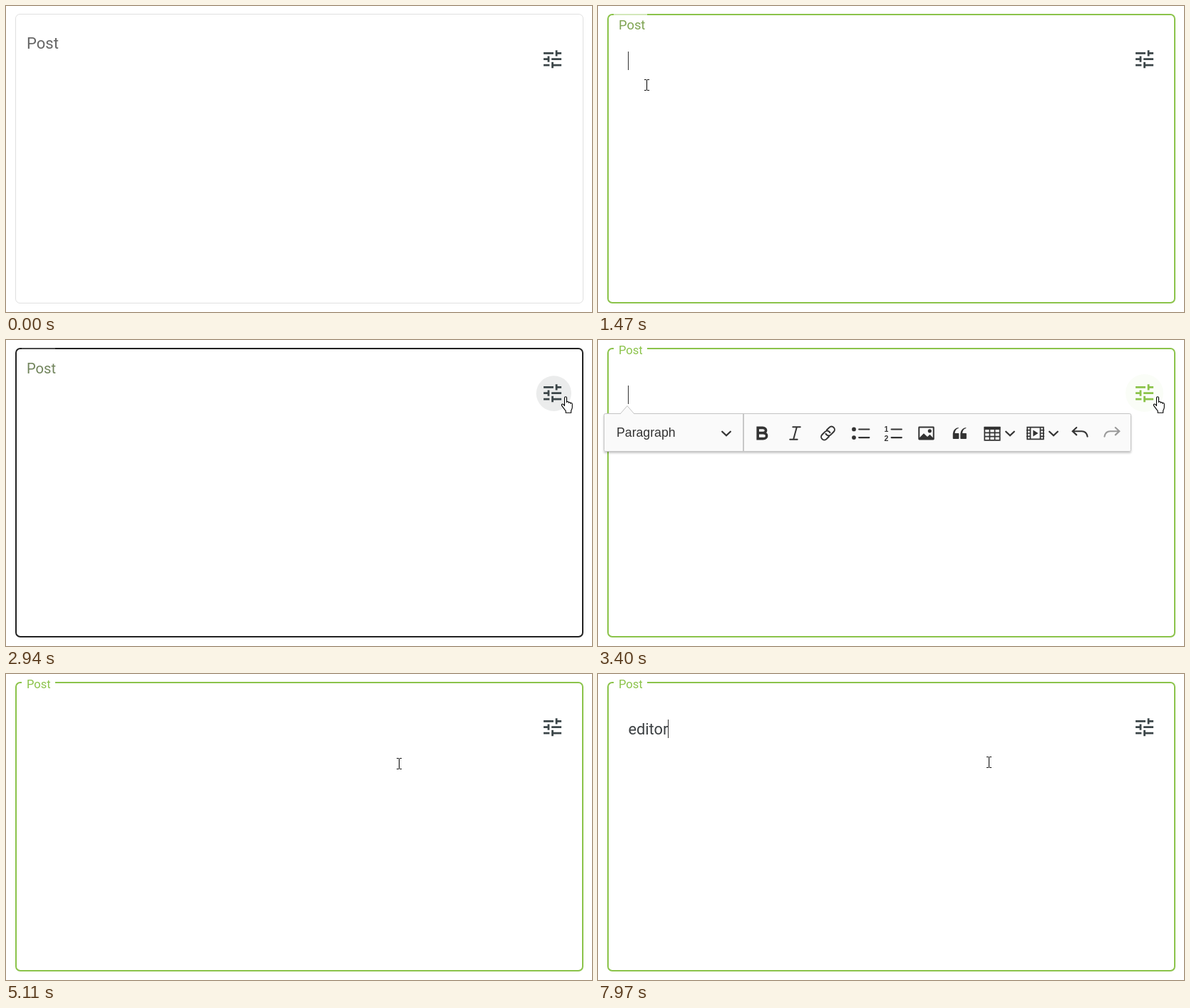
Write an HTML page with a canvas that moves like this. It is 822x430 px and loops after 8000 ms.

```html
<!DOCTYPE html>
<html lang="en">
<head>
<meta charset="utf-8">
<title>Post editor</title>
<style>
  html, body { margin: 0; width: 100%; height: 100%; overflow: hidden; background: #fff; }
  canvas { display: block; }
</style>
</head>
<body>
<canvas id="stage" width="822" height="430"></canvas>
<script>
const ctx = document.getElementById('stage').getContext('2d');
const LOOP = 8000;
const GREEN = [139, 195, 74], GREY = [102, 102, 102], DARK = [33, 33, 33], SLATE = [59, 69, 72];
const INK = '#333', PANEL = '#fafafa';
const BUTTON = { x: 766.5, y: 74.5, r: 26.5 };

const focusChanges = [[1380, 1], [2850, 0], [3075, 1], [3950, 0], [4175, 1]];
const caretSpans = [[1380, 1860], [2390, 2850], [3075, 3550], [4175, 4730], [5260, 5810],
  [6190, 6430], [6580, 6960], [7130, 7440], [7970, 8000]];
const keyTimes = [6190, 6360, 6580, 6810, 7130, 7360];
const pointerKeys = [[300, 44, 411], [1000, 66, 111], [1450, 66, 111], [2080, 790, 104],
  [2390, 785.5, 84], [2590, 785.5, 84], [2700, 784.5, 80], [3950, 784.5, 80], [4180, 780.5, 81],
  [4210, 780.5, 81], [4730, 554, 127], [4990, 554, 127], [5260, 548, 124]];

const clamp = v => Math.min(1, Math.max(0, v));
const lerp = (a, b, p) => a + (b - a) * p;
const rgb = (c, a = 1) => `rgba(${c.map(Math.round).join()},${a})`;
const mix = (a, b, p) => a.map((v, i) => lerp(v, b[i], p));
const within = (t, [a, b]) => t >= a && t < b;

// cubic-bezier(.25, .8, .25, 1)
function swift(x) {
  if (x <= 0) return 0;
  if (x >= 1) return 1;
  let lo = 0, hi = 1, s;
  for (let i = 0; i < 24; i++) {
    s = (lo + hi) / 2;
    if (.75 * s * (1 - s) + s ** 3 < x) lo = s; else hi = s;
  }
  return 2.4 * s * (1 - s) ** 2 + 3 * s * s * (1 - s) + s ** 3;
}

function isFocused(t) {
  return focusChanges.reduce((on, [start, to]) => t >= start ? to : on, 0);
}

function labelFloat(t) {
  let value = 0;
  focusChanges.forEach(([start, to], i) => {
    if (t < start) return;
    const next = focusChanges[i + 1];
    const end = next ? Math.min(t, next[0]) : t;
    value = lerp(value, to, swift((end - start) / 400));
  });
  return value;
}

function pointerAt(t) {
  if (t < pointerKeys[0][0]) return null;
  const i = pointerKeys.findIndex(k => k[0] > t);
  if (i < 0) return pointerKeys.at(-1).slice(1);
  const [t0, x0, y0] = pointerKeys[i - 1], [t1, x1, y1] = pointerKeys[i];
  const p = (t - t0) / (t1 - t0), e = p * p * (3 - 2 * p);
  return [lerp(x0, x1, e), lerp(y0, y1, e)];
}

function text(str, x, y, font, color) {
  ctx.font = font;
  ctx.fillStyle = color;
  ctx.fillText(str, x, y);
}

function frame(inset, width, color) {
  ctx.beginPath();
  ctx.roundRect(13 + inset, 11 + inset, 797 - 2 * inset, 407 - 2 * inset, 6);
  ctx.lineWidth = width;
  ctx.strokeStyle = color;
  ctx.stroke();
}

function drawField(t) {
  const hover = swift((t - 300) / 600), float = labelFloat(t);
  if (hover < 1) frame(.5, 1, `rgba(0,0,0,${.12 * (1 - hover)})`);
  if (hover > 0) frame(1, 2, rgb(isFocused(t) ? GREEN : DARK, hover));
  ctx.fillStyle = `rgba(255,255,255,${clamp((float - .2) / .75)})`;
  ctx.fillRect(22, 10, 47, 4);
  text('Post', 29, lerp(60, 20, float), `${lerp(22, 16.5, float)}px Roboto, sans-serif`,
    rgb(mix(GREY, GREEN, float)));
}

function drawContent(t) {
  const typed = 'editor'.slice(0, keyTimes.filter(k => t >= k).length);
  text(typed, 42.4, 85, '21.8px Roboto, sans-serif', '#3c4043');
  if (caretSpans.some(s => within(t, s))) {
    ctx.fillStyle = INK;
    ctx.fillRect(Math.floor(42.9 + ctx.measureText(typed).width), 64, 1, 26);
  }
}

const tune = new Path2D('M3 17v2h6v-2H3zM3 5v2h10V5H3zm10 16v-2h8v-2h-8v-2h-2v6h2zM7 9v2H3v2h4v2h2V9H7z' +
  'm14 4v-2H11v2h10zm-6-4h2V7h4V5h-4V3h-2v6z');

function drawRipple(t, press, fadeStart, fadeEnd, color) {
  if (!within(t, [press, fadeEnd])) return;
  const grow = swift((t - press) / 225);
  const alpha = .1 * (1 - clamp((t - fadeStart) / (fadeEnd - fadeStart)));
  ctx.save();
  ctx.beginPath();
  ctx.arc(BUTTON.x, BUTTON.y, BUTTON.r, 0, 7);
  ctx.clip();
  ctx.beginPath();
  ctx.arc(lerp(784, BUTTON.x, grow), lerp(80, BUTTON.y, grow), 28 * grow, 0, 7);
  ctx.fillStyle = rgb(color, alpha);
  ctx.fill();
  ctx.restore();
}

function drawButton(t) {
  const color = within(t, [3075, 4175]) ? GREEN : SLATE;
  drawRipple(t, 2850, 3200, 3560, color);
  drawRipple(t, 3950, 4200, 4650, color);
  ctx.save();
  ctx.translate(749.9, 58);
  ctx.scale(1.39, 1.39);
  ctx.fillStyle = rgb(color);
  ctx.fill(tune);
  ctx.restore();
}

// Toolbar icons on a 20-unit grid: centre x, stroke path, stroke width, fill path
const undo = 'M6.4 4 2.2 7.9l4.2 3.9M2.6 7.9H12c3.6 0 5.3 1.8 6 5.6';
const quote = 'a6.5 6.5 0 0 1 6.06-6.4v.7c-2.66.7-3.76 2.9-3.86 5.3H9q.5 0 .5.6v4.8q0 .6-.6.6H3.6q-.6 0-.6-.6z';
const chevron = 'M5.6 8.3l4.4 4.2 4.4-4.2';
const listLines = 'M8.2 5.8H19M8.2 14.6H19';
const icons = [
  { x: 180, line: chevron, width: 1.7 },
  { x: 230.5, line: 'M5.2 4.2h5.2c4.6 0 4.6 5.5 0 5.5H5.2zM5.2 9.7h5.6c5.1 0 5.1 6.1 0 6.1H5.2z', width: 2.7 },
  { x: 276.5, line: 'M7.6 3.4h7.9M4.5 16.6h7.9M11.8 3.4 8.2 16.6', width: 1.5 },
  { x: 322.5, line: 'M8.5 13.3H4.6a3.3 3.3 0 0 1 0-6.6H9a3.3 3.3 0 0 1 3 4.5M11.5 6.7h3.9a3.3 3.3 0 0 1 0 6.6H11a3.3 3.3 0 0 1-3-4.5',
    width: 1.5, turn: -Math.PI / 4 },
  { x: 368.5, line: listLines, width: 1.6,
    fill: 'M.6 5.8a2.2 2.2 0 1 0 4.4 0 2.2 2.2 0 1 0-4.4 0zM.6 14.6a2.2 2.2 0 1 0 4.4 0 2.2 2.2 0 1 0-4.4 0z' },
  { x: 414, line: listLines, width: 1.6 },
  { x: 460.5, fill: 'M2.6 2.8h14.8q1.1 0 1.1 1.1v12.2q0 1.1-1.1 1.1H2.6q-1.1 0-1.1-1.1V3.9q0-1.1 1.1-1.1z' +
    'M3 4.3v10.3l4.3-4.4 3.9 3.6 2.6-2.4 3.2 3.4V4.3zM11.7 7.6a1.95 1.95 0 1 0 3.9 0 1.95 1.95 0 1 0-3.9 0z' },
  { x: 507, fill: 'M3 10.4' + quote, repeat: 8 },
  { x: 553, line: 'M1.9 3.8h16.2v13.6H1.9zM2 9.6h16M2 13.5h16M7.3 6v11M12.7 6v11', width: 1.3, fill: 'M1.4 3h17.2v3.2H1.4z' },
  { x: 578, line: chevron, width: 1.7 },
  { x: 613.5, line: 'M1.4 3.7h17.2v12.6H1.4zM4.7 4v12M15.3 4v12M1 6.7h3.5M1 10h3.5M1 13.3h3.5M15.5 6.7H19M15.5 10H19M15.5 13.3H19',
    width: 1.3, fill: 'M7.6 6.6v6.8l5.4-3.4z' },
  { x: 639, line: chevron, width: 1.7 },
  { x: 676, line: undo, width: 1.6 },
  { x: 721, line: undo, width: 1.6, flip: true, color: '#9a9a9a' }
];

function drawIcon({ x, line, width, fill, turn = 0, repeat, flip, color = INK }) {
  ctx.save();
  ctx.translate(x, 131);
  ctx.scale(flip ? -1.32 : 1.32, 1.32);
  ctx.rotate(turn);
  ctx.translate(-10, -10);
  ctx.strokeStyle = ctx.fillStyle = color;
  ctx.lineWidth = width;
  ctx.lineCap = 'round';
  if (line) ctx.stroke(new Path2D(line));
  if (fill) {
    const shape = new Path2D(fill);
    ctx.fill(shape, 'evenodd');
    if (repeat) {
      ctx.translate(repeat, 0);
      ctx.fill(shape);
    }
  }
  ctx.restore();
}

function drawToolbar() {
  ctx.save();
  ctx.shadowColor = 'rgba(0,0,0,.22)';
  ctx.shadowBlur = 3;
  ctx.shadowOffsetY = 2;
  ctx.fillStyle = PANEL;
  ctx.beginPath();
  ctx.roundRect(8, 103, 740, 54, 2);
  ctx.fill();
  ctx.restore();

  ctx.strokeStyle = '#c4c4c4';
  ctx.lineWidth = 1;
  ctx.beginPath();
  ctx.roundRect(8.5, 103.5, 739, 53, 2);
  ctx.stroke();
  ctx.fillStyle = PANEL;
  ctx.beginPath();
  ctx.moveTo(31, 104);
  ctx.lineTo(41, 92.5);
  ctx.lineTo(51, 104);
  ctx.fill();
  ctx.stroke();
  ctx.fillStyle = '#c8c8c8';
  ctx.fillRect(203, 104, 2, 52);

  text('Paragraph', 26, 136, '17.7px "Liberation Sans", Arial, sans-serif', INK);
  const digits = 'bold 10.5px "Liberation Sans", Arial, sans-serif';
  text('1', 401.5, 129, digits, INK);
  text('2', 401.5, 141.5, digits, INK);
  icons.forEach(drawIcon);
}

const hand = new Path2D('M5.5 2.2c0-2 3-2 3 0v6.3c0-1.5 2.7-1.3 2.7.2v.6c.2-1.3 2.6-1.1 2.6.4v.6c.3-1.2 2.5-1 2.5.7v4.5' +
  'c0 2-1 3.2-1.6 4.8v2.9H7.2v-2.6c-1.6-1.6-3.4-4.4-5.3-6.9-1.6-2.2.7-3.6 2.3-1.9l1.3 1.5z');

function drawPointer(t) {
  const pos = pointerAt(t);
  if (!pos) return;
  const [x, y] = pos;
  ctx.save();
  if (Math.hypot(x - BUTTON.x, y - BUTTON.y) < 28) {
    ctx.translate(Math.round(x - 6.5), Math.round(y - 1));
    ctx.fillStyle = '#fff';
    ctx.strokeStyle = '#000';
    ctx.lineWidth = 1.1;
    ctx.lineJoin = 'round';
    ctx.fill(hand);
    ctx.stroke(hand);
  } else {
    ctx.translate(Math.round(x), Math.round(y));
    ctx.fillStyle = '#000';
    ctx.fillRect(0, -7, 1, 14);
    for (const edge of [-8, 7]) {
      ctx.fillRect(-3, edge, 3, 1);
      ctx.fillRect(1, edge, 3, 1);
    }
  }
  ctx.restore();
}

function draw(t) {
  ctx.fillStyle = '#fff';
  ctx.fillRect(0, 0, 822, 430);
  drawField(t);
  drawContent(t);
  drawButton(t);
  if (within(t, [3090, 3950])) drawToolbar();
  drawPointer(t);
}

const start = performance.now();
function tick() {
  draw((performance.now() - start) % LOOP);
  requestAnimationFrame(tick);
}
tick();
</script>
</body>
</html>
```
